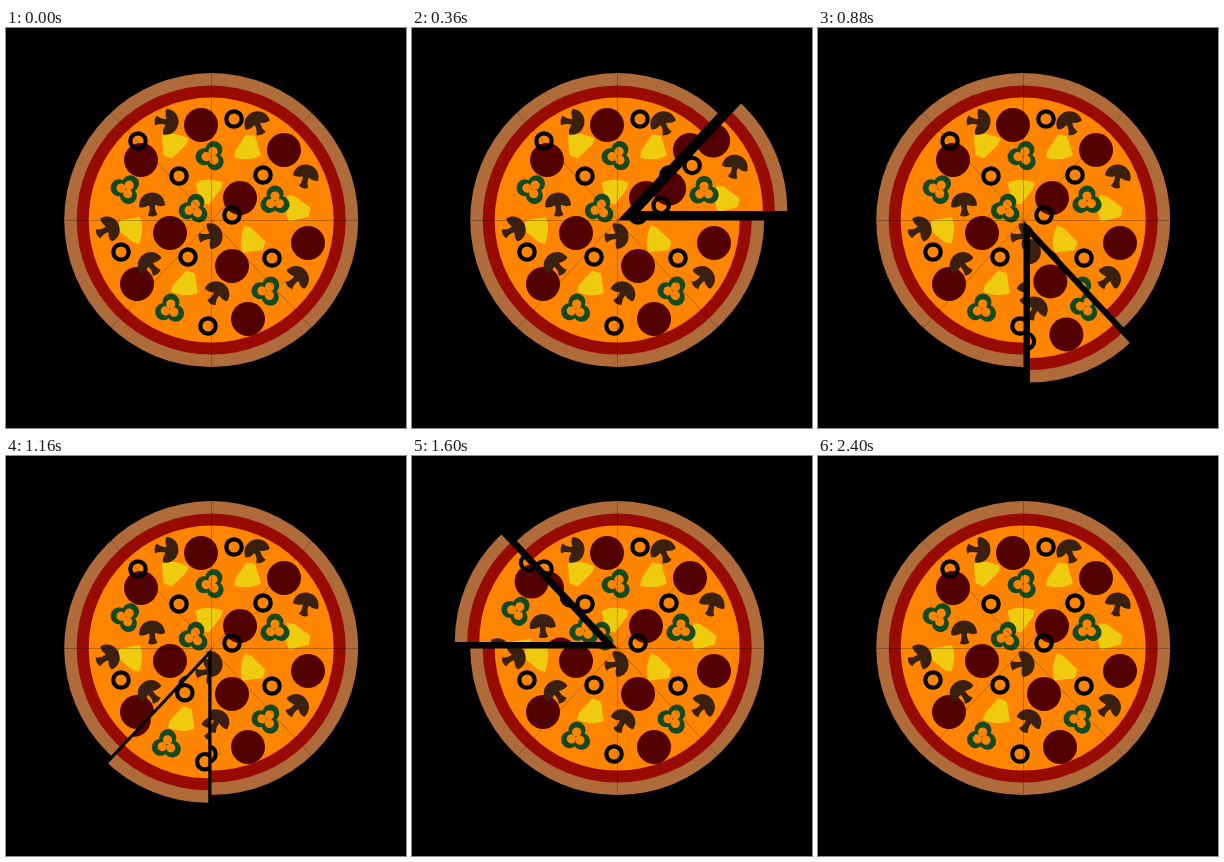
An HTML page for the animation above (2880 ms loop, 400 px wide and 400 px high).

```html
<!DOCTYPE html>
<html lang="en">
<head>
<meta charset="utf-8">
<title>Pizza</title>
<style>
html, body { margin: 0; width: 100%; height: 100%; overflow: hidden; background: #000; }
svg { display: block; width: 100%; height: 100%; }
</style>
</head>
<body>
<svg id="stage" viewBox="0 0 400 400">
  <defs>
    <circle id="pepperoni" r="17" fill="#530000"/>
    <circle id="olive" r="7.700" fill="none" stroke="#000" stroke-width="4.200"/>
    <path id="pineapple" fill="#efcb10" d="M-4-13 H5 L14 5 Q5 13-12 12 L-12 5 Z"/>
    <path id="mushroom" fill="#3b2010" d="M-13 2 C-13-16 13-16 13 2 Q9 4 3 1 Q2 7 5 11 Q0 14-5 11 Q-2 7-3 1 Q-9 4-13 2 Z"/>
    <g id="pepper"></g>
    <g id="pizza"></g>
  </defs>
</svg>
<script>
const NS = 'http://www.w3.org/2000/svg';
const CX = 205.5, CY = 192.5, SLICES = 8;
const LOOP = 2880, STEP = 40, BEAT = 240, REACH = 25;
const CHEESE = '#ff8400';
const stage = document.getElementById('stage');
const pizza = document.getElementById('pizza');
const pepper = document.getElementById('pepper');

function add(parent, tag, attrs) {
  const el = document.createElementNS(NS, tag);
  for (const k in attrs) el.setAttribute(k, attrs[k]);
  return parent.appendChild(el);
}

function disc(r, fill) {
  add(pizza, 'circle', { cx: CX - 0.3, cy: CY - 0.4, r, fill });
}

// each piece is turned one step further than the one before
function scatter(kind, spots, first = 0, step = 0) {
  spots.forEach(([x, y], i) => add(pizza, 'use', {
    href: '#' + kind,
    transform: `translate(${x} ${y}) rotate(${first + step * i})`
  }));
}

// three lobes around the middle
function trefoil(dist, r, fill) {
  for (let turn = 0; turn < 360; turn += 120)
    add(pepper, 'circle', { cy: -dist, r, fill, transform: `rotate(${turn})` });
}
trefoil(7, 8.5, '#144a20');
trefoil(5, 4.6, CHEESE);

disc(147, '#b06b3a');
disc(134.5, '#970b03');
disc(122.5, CHEESE);
scatter('pineapple', [[242, 120], [291, 181], [202, 163], [125, 201], [180, 256], [246, 213], [167, 117]], 10, 92);
scatter('pepperoni', [[195, 97], [278, 122], [302, 215], [242, 291], [131, 256], [135, 132], [234, 170], [226, 238], [164, 205]]);
scatter('mushroom', [[144, 236], [251, 95], [146, 176], [300, 148], [211, 265], [291, 250], [102, 201], [205, 208], [161, 94]], -38, 17);
scatter('pepper', [[269, 173], [164, 281], [188, 181], [205, 128], [261, 263], [120, 161]], 0, 8);
scatter('olive', [[228, 91], [257, 147], [226, 187], [266, 230], [202, 298], [182, 229], [115, 224], [173, 148], [132, 113]]);

// far point on cut i; the diagonal cuts are a little steep
function cut(i) {
  const a = i * 2 * Math.PI / SLICES;
  return `${CX + 300 * Math.sin(a)} ${CY - 321 * Math.cos(a)}`;
}

const slices = Array.from({ length: SLICES }, (_, i) => {
  const clip = add(stage, 'clipPath', { id: 'wedge' + i });
  add(clip, 'path', { d: `M${CX} ${CY} L${cut(i)} L${cut(i + 1)} Z` });
  const el = add(stage, 'g', {});
  const wedge = add(el, 'g', { 'clip-path': `url(#wedge${i})` });
  // near-full opacity flattens the pizza before it is clipped
  add(wedge, 'use', { href: '#pizza', opacity: 0.999 });
  const a = (i + 0.5) * 2 * Math.PI / SLICES;
  return { el, dx: REACH * Math.sin(a), dy: -REACH * Math.cos(a) };
});

function draw(ms) {
  const t = Math.floor((ms % LOOP) / STEP) * STEP;
  slices.forEach(({ el, dx, dy }, i) => {
    const k = Math.max(0, 1 - Math.abs((t - i * BEAT) / (BEAT / 2) - 1));
    el.setAttribute('transform', `translate(${dx * k} ${dy * k})`);
  });
}

const start = performance.now();
function tick() {
  draw(performance.now() - start);
  requestAnimationFrame(tick);
}
draw(0);
requestAnimationFrame(tick);
</script>
</body>
</html>
```
